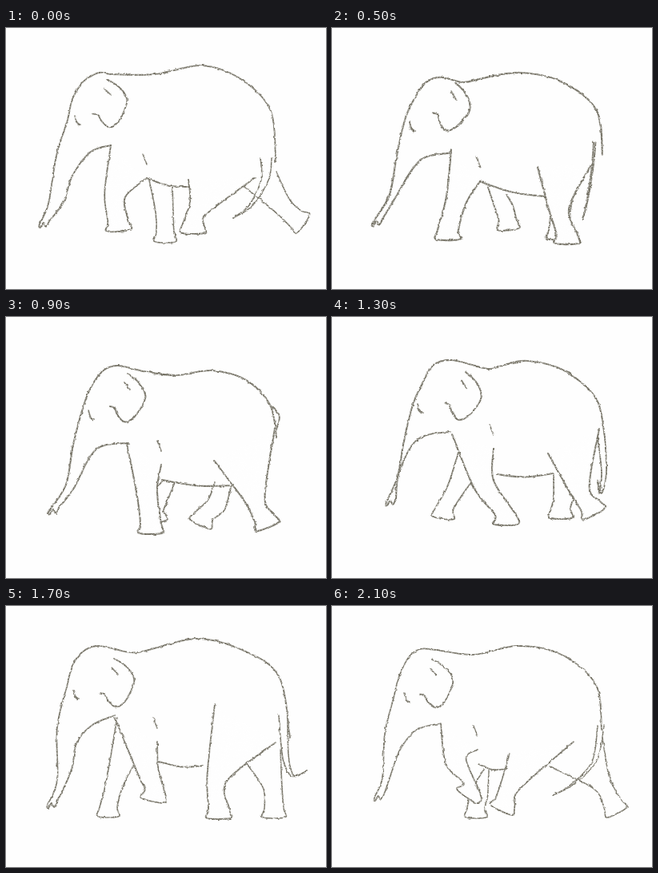
An HTML page that plays this animation: 400 px wide and 327 px high, repeating every 2.3 s.

```html
<!DOCTYPE html>
<html lang="en">
<head>
<meta charset="utf-8">
<title>Walking elephant</title>
<style>
  html, body { margin: 0; width: 100%; height: 100%; overflow: hidden; background: #fefefe; }
  svg { display: block; width: 100%; height: 100%; }
  path { fill: none; stroke: #737063; stroke-linecap: round; stroke-linejoin: round; }
  .solid { fill: #fefefe; }
</style>
</head>
<body>
<svg viewBox="0 0 400 327">
  <defs>
    <filter id="pencil" filterUnits="userSpaceOnUse" x="0" y="0" width="400" height="327" color-interpolation-filters="sRGB">
      <feTurbulence class="grain" type="fractalNoise" baseFrequency="0.18" numOctaves="2" result="wobble"/>
      <feDisplacementMap in="SourceGraphic" in2="wobble" scale="3" xChannelSelector="R" yChannelSelector="G" result="rough"/>
      <feTurbulence class="grain" type="fractalNoise" baseFrequency="0.6" numOctaves="2" result="noise"/>
      <feColorMatrix in="noise" type="matrix" values="0 0 0 0 0  0 0 0 0 0  0 0 0 0 0  1.8 0 0 0 -0.05" result="tooth"/>
      <feComposite in="rough" in2="tooth" operator="in"/>
    </filter>
  </defs>
  <g filter="url(#pencil)" id="art"></g>
</svg>
<script>
// Rig joints of the key poses.
// trunk: tip to crest; back: withers to tail root; under: trunk to chest
// ear: top corner, turn; legs: front, knee, foot, back, sole tilt; tail: joints, width
const poses = [
  {
    weight: '1.9', eye: '89,119', ear: '125,64 -8', belly: '176,188 228,199',
    trunk: '42,246 53,220 63,160 77,115 83,89 97,67 116,56 133,58',
    back: '185,58 246,47 295,65 331,104 337,168', under: '72,218 83,185 106,155 131,147',
    nearFore: '131,147 136,210 141,253 176,188 -4', farFore: '179,190 198,230 199,267 208,200 0',
    nearHind: '228,190 241,225 234,256 312,187 0', farHind: '293,195 345,222 371,245 338,180 -55',
    tail: '318,163 319,190 304,222 284,238 14'
  }, {
    weight: '2.2', eye: '97,127', ear: '152,72 8', belly: '181,195 252,209',
    trunk: '45,241 66,205 76,155 85,112 102,82 115,70 132,65 158,70',
    back: '185,65 235,57 285,67 330,105 339,165', under: '76,207 100,177 120,162 146,156',
    nearFore: '146,155 144,215 124,261 181,195 0', farFore: '195,201 226,230 231,257 228,212 -30',
    nearHind: '257,181 264,225 273,269 320,175 0', farHind: '280,222 306,235 310,263 326,190 0',
    tail: '326,155 322,190 319,232 300,254 -5'
  }, {
    weight: '2.3', eye: '103,127', ear: '157,66 8', belly: '190,190 278,213',
    trunk: '57,246 77,215 86,165 98,115 107,90 120,66 140,58 170,66',
    back: '200,59 237,55 290,68 331,101 337,152', under: '86,212 100,178 115,161 152,157',
    nearFore: '152,150 167,215 166,267 190,188 0', farFore: '195,198 205,222 210,246 210,208 20',
    nearHind: '257,167 303,225 314,269 330,165 0', farHind: '262,209 264,235 256,264 278,214 0',
    tail: '333,132 330,165 319,205 326,226 0'
  }, {
    weight: '2.1', eye: '106,126', ear: '152,71 0', belly: '195,204 285,211',
    trunk: '54,243 75,210 84,160 98,108 109,83 123,66 141,61 172,68',
    back: '213,73 257,67 300,79 330,110 338,150', under: '85,214 105,175 122,161 153,158',
    nearFore: '151,159 176,218 181,270 194,185 0', farFore: '196,205 190,230 188,256 211,207 -10',
    nearHind: '260,180 311,228 327,262 336,140 -22', farHind: '261,207 263,235 243,259 281,214 25',
    tail: '332,112 341,122 341,132 337,143 0'
  }, {
    weight: '2.1', eye: '110,118', ear: '167,69 5', belly: '206,197 276,196',
    trunk: '68,232 82,200 90,155 101,110 112,85 126,61 150,54 195,65',
    back: '215,60 245,55 290,67 330,102 341,150', under: '83,198 99,162 118,148 148,144',
    nearFore: '150,147 190,210 217,259 202,165 0', farFore: '160,163 155,215 139,251 175,206 8',
    nearHind: '270,171 309,215 328,246 334,140 -28', farHind: '277,198 289,225 286,251 290,208 0',
    tail: '341,150 343,195 337,221 332,205 -9'
  }, {
    weight: '1.9', eye: '87,114', ear: '135,66 -6', belly: '191,195 247,200',
    trunk: '52,249 64,218 64,152 77,97 83,75 95,58 113,50 133,53',
    back: '165,58 237,41 295,55 341,88 355,165', under: '82,205 88,172 108,149 136,137',
    nearFore: '136,140 178,208 184,243 189,170 12', farFore: '139,140 136,222 128,263 162,195 0',
    nearHind: '261,123 264,215 266,265 337,171 0', farHind: '299,195 333,225 335,264 343,180 0',
    tail: '341,137 346,190 357,213 375,207 11'
  }, {
    weight: '1.8', eye: '93,118', ear: '125,67 -8', belly: '183,198 218,204',
    trunk: '53,240 63,215 66,160 77,115 84,88 96,64 110,54 130,55',
    back: '178,61 232,50 287,61 330,99 337,155', under: '74,210 85,180 106,155 136,147',
    nearFore: '136,147 155,195 169,238 182,180 35', farFore: '190,205 184,235 180,264 196,205 0',
    nearHind: '222,185 224,222 212,255 302,170 25', farHind: '272,201 337,222 356,258 338,165 -27',
    tail: '332,150 325,195 297,225 276,237 8'
  }
];

// Pose position for each drawing; halves lie midway between two key poses.
const steps = [0, 0.5, 1, 1.5, 2, 3, 3.5, 4, 4.5, 5, 5.5, 6];

const parse = s => s.split(' ').map(p => p.split(',').map(Number));
const move = (p, dx, dy) => [p[0] + dx, p[1] + dy];
const along = (p, v, d) => move(p, v[0] * d, v[1] * d);
const mid = (a, b) => [(a[0] + b[0]) / 2, (a[1] + b[1]) / 2];
const turned = deg => {
  const a = deg * Math.PI / 180;
  return [Math.cos(a), Math.sin(a)];
};

const earShape = parse('0,0 11,8 20,20 22,32 12,50 4,58 -5,60 -13,51 -16,43 -22,41');
const earFold = parse('-4,11 3,20');
const tipShape = parse('12,-4 8,3 5,-2 1,4');

function poseAt(s) {
  const a = poses[Math.floor(s)], b = poses[Math.ceil(s)], u = s % 1, pose = {};
  for (const part in a) {
    const q = parse(b[part]);
    pose[part] = parse(a[part]).map((p, i) => p.map((v, c) => v + (q[i][c] - v) * u));
  }
  return pose;
}

// Smooth curve through the points.
function curve(p) {
  const at = i => p[Math.max(0, Math.min(p.length - 1, i))];
  const handle = (i, s) => [0, 1].map(c => (at(i)[c] + s * (at(i + 1)[c] - at(i - 1)[c]) / 6).toFixed(1));
  let d = 'M' + p[0];
  for (let i = 0; i < p.length - 1; i++) d += `C${handle(i, 1)} ${handle(i + 1, -1)} ${p[i + 1]}`;
  return d;
}

// Outline down the front of a leg, round the sole and up the back.
function leg([front, knee, foot, back, [tilt]], girth, sole) {
  const flat = turned(tilt), up = [flat[1], -flat[0]];
  const ankle = along(foot, up, 11), hip = mid(front, back);
  const dx = ankle[0] - hip[0], dy = ankle[1] - hip[1], len = Math.hypot(dx, dy);
  const side = [dy / len, -dx / len];
  return [
    front, along(knee, side, -girth), along(ankle, flat, -girth),
    along(foot, flat, -sole), along(foot, up, -2), along(foot, flat, sole),
    along(ankle, flat, girth), along(knee, side, girth), back
  ];
}

function drawing(step) {
  const pose = poseAt(step), [[weight]] = pose.weight;
  let out = '';
  const stroke = (pts, extra = 0, type = '') =>
    out += `<path class="${type}" d="${curve(pts)}" stroke-width="${(weight + extra).toFixed(2)}"/>`;

  stroke(leg(pose.farFore, 11, 14), -0.2);
  stroke(leg(pose.farHind, 12, 15), -0.2);
  stroke(leg(pose.nearHind, 13, 16), 0, 'solid');
  stroke(leg(pose.nearFore, 13, 16), 0, 'solid');

  const [start, end] = pose.belly;
  stroke([start, move(mid(start, end), 0, 4), end]);

  const tip = pose.trunk[0], curl = tipShape.map(p => move(tip, ...p));
  stroke([...curl, ...pose.trunk, ...pose.back]);
  stroke([curl[0], ...pose.under]);

  const [corner, [turn]] = pose.ear, [cos, sin] = turned(turn);
  const place = ([x, y]) => move(corner, x * cos - y * sin, x * sin + y * cos);
  stroke(earShape.map(place));
  stroke(earFold.map(place), -0.3);

  const eye = pose.eye[0];
  stroke([move(eye, -3, -9), eye, move(eye, 4, 2)], -0.3);
  stroke([move(eye, -1, -1), move(eye, 2, 2)], 0.6);

  const shoulder = pose.nearFore[3];
  stroke([move(shoulder, -5, -30), move(shoulder, 0, -17)], -0.4);

  const tail = pose.tail.slice(0, 4), [width] = pose.tail[4];
  stroke(tail, -0.2);
  if (width) stroke(tail.map((p, i) => move(p, width * (1 - i / 3), 0)), -0.3);
  return out;
}

const cycle = steps.map(drawing);
const art = document.getElementById('art');
const grains = document.querySelectorAll('.grain');
let shown = -1;

function render(ms) {
  const i = Math.floor((ms % 2300 + 100) / 200);
  if (i === shown) return;
  shown = i;
  grains.forEach(g => g.setAttribute('seed', i + 1));
  art.innerHTML = cycle[i];
}

function tick() {
  render(performance.now());
  requestAnimationFrame(tick);
}
tick();
</script>
</body>
</html>
```
